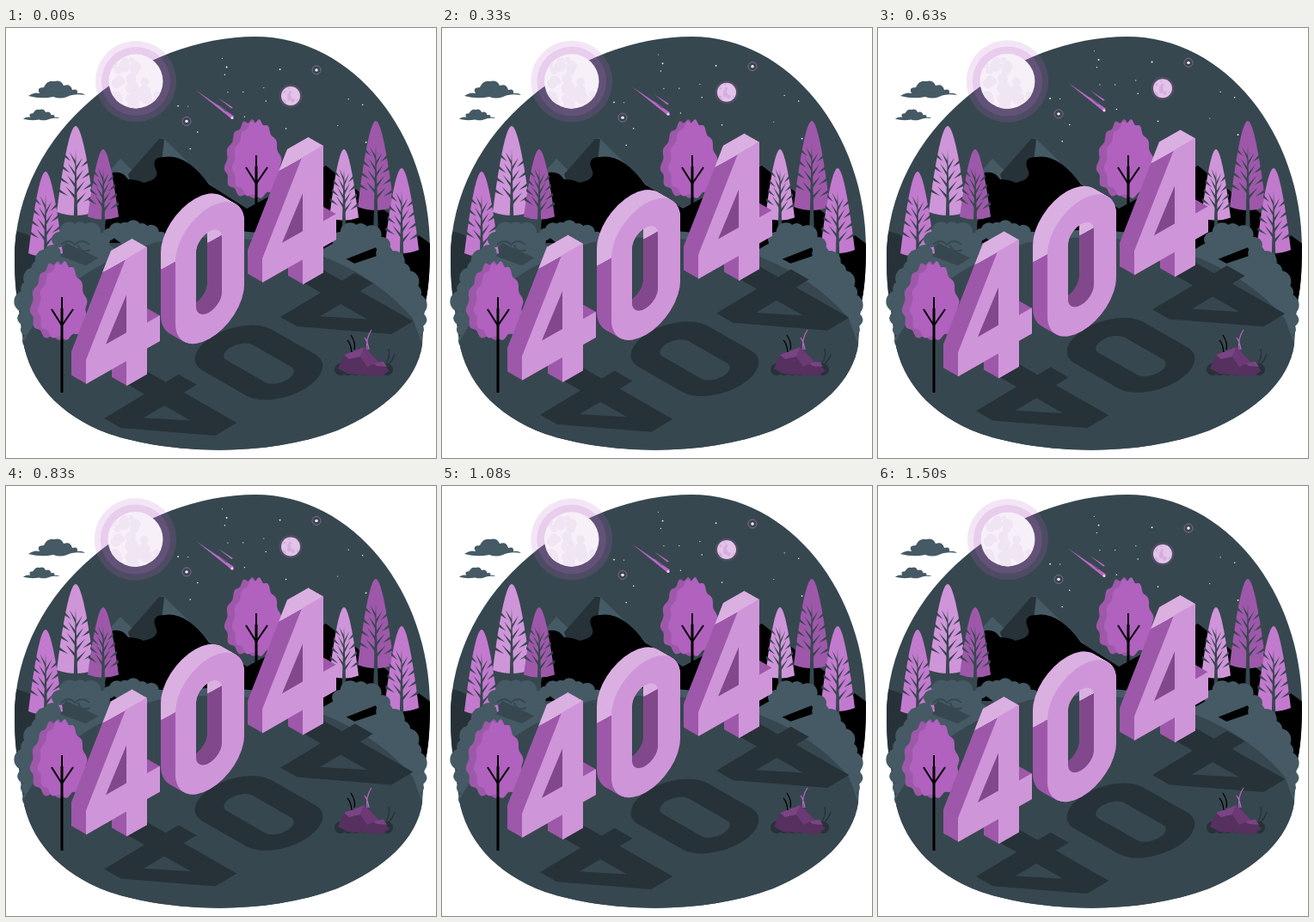
Recreate the animation shown at these times as an HTML page with a canvas. Size 500 by 500 pixels, loop 1540 ms.

```html
<!DOCTYPE html>
<html lang="en">
<head>
<meta charset="utf-8">
<style>
html, body { margin: 0; height: 100%; overflow: hidden; background: #fff; }
canvas { display: block; width: 500px; height: 500px; }
</style>
</head>
<body>
<canvas id="stage" width="500" height="500"></canvas>
<script>
const ctx = document.getElementById('stage').getContext('2d');
const LOOP = 1540, PEAK = 725, LIFT = 9;
const SLATE = '#37474f', LIGHT_SLATE = '#455a64', SHADOW = '#263238';
const PURPLE = '#ba68c8', FRONT = '#cf95d9', SIDE = '#9e58aa', TOP = '#dab0e1', WALL = '#82488c';

function seeded(seed) {
  return (min, max) => {
    seed = seed * 16807 % 2147483647;
    return min + (max - min) * seed / 2147483647;
  };
}
function fill(color, d) {
  ctx.fillStyle = color;
  ctx.fill(d instanceof Path2D ? d : new Path2D(d), 'evenodd');
}
function line(color, width, d) {
  ctx.strokeStyle = color;
  ctx.lineWidth = width;
  ctx.stroke(new Path2D(d));
}
function dot(color, x, y, r) {
  ctx.fillStyle = color;
  ctx.beginPath();
  ctx.arc(x, y, r, 0, 7);
  ctx.fill();
}
function at(x, y, draw) {
  ctx.save();
  ctx.translate(x, y);
  draw();
  ctx.restore();
}
function clipped(path, draw) {
  ctx.save();
  ctx.clip(path);
  draw();
  ctx.restore();
}

const GROUND = 'L484 368C478 410 440 445 385 468C300 500 190 495 120 472C60 450 28 410 20 365';
const BLOB = new Path2D(`M290 10C405 10 493 125 493 255Q493 300 487 322${GROUND}L14 322Q10 300 10 270C10 115 160 10 290 10Z`);

function cloud(x, y, scale) {
  at(x, y, () => {
    ctx.scale(scale, scale);
    fill(LIGHT_SLATE, 'M-33 9Q-26 4 -20 6Q-24 -1 -15 -1Q-11 -10 -3 -8Q5 -10 8 -3Q16 -6 18 2Q25 0 24 6Q30 5 33 8Q20 6 12 10Q4 13 -4 10Q-18 13 -33 9Z');
  });
}

function globe(color, patch, r, count) {
  const random = seeded(9), disc = new Path2D();
  disc.arc(0, 0, r, 0, 7);
  fill(color, disc);
  clipped(disc, () => {
    for (let i = 0; i < count; i++) {
      dot(patch, random(-r, r), random(-r, r), r * random(.08, .24));
    }
  });
}

function stars() {
  const random = seeded(42);
  for (let i = 0; i < 18; i++) {
    dot('#fff', random(200, 420), random(34, 142), random(.5, 1));
  }
  for (const [x, y] of [[361, 49], [210, 108.5]]) {
    dot('#fff', x, y, 1.7);
    line('#9a70a6', .8, `M${x - 5} ${y}a5 5 0 1 0 10 0a5 5 0 1 0 -10 0`);
  }
  at(331, 79, () => {
    dot('rgba(186,104,200,.18)', 0, 0, 13.5);
    globe('#e3c3e9', '#d5add e'.replace(' ', ''), 11, 12);
  });
  at(263, 104.5, () => {
    fill(PURPLE, 'M-42 -32L2 -2 -1 1ZM-16 -23L1 -12 -1 -11ZM-18 -16L-6 -8 -7 -7Z');
    dot('#edcdf2', 0, 0, 1.6);
  });
}

function moon(rise) {
  at(151 - rise * .06, 62, () => {
    const k = 1 + rise * .0018;
    ctx.scale(k, k);
    dot('rgba(186,104,200,.17)', 0, 0, 47);
    dot('rgba(186,104,200,.2)', 0, 0, 40);
    globe('#f7f0f9', '#f0e5f3', 31.5, 26);
  });
}

function mountains() {
  fill(SHADOW, 'M8 236Q50 240 65 300V325H8Z');
  fill(LIGHT_SLATE, 'M90 200L133 152 182 200ZM182 127L250 194H180Z');
  fill(SHADOW, 'M142 170L178 129 184 129 176 200H150Z');
  fill('#000', 'M112 250L124 168Q136 166 142 176Q152 176 160 180Q180 176 174 164Q168 150 184 150Q210 146 236 182L280 210 372 160 410 190 495 252V322H280V250Z');
}

function pine(x, y, w, h, color) {
  at(x, y, () => {
    fill(color, `M0 0C${w * .35} 0 ${w * .75} ${h * .55} ${w} ${h * .97}Q0 ${h * 1.05} ${-w} ${h * .97}C${-w * .75} ${h * .55} ${-w * .35} 0 0 0Z`);
    for (let i = 0; i < 8; i++) {
      const s = i % 2 ? 1 : -1, level = h * (.36 + .065 * i), edge = w * (.55 + .055 * i);
      fill(SLATE, `M${s * (edge + 1)} ${level - 5}V${level - 1}L${s * edge * .45} ${level + 4}Z`);
      fill(SLATE, `M0 ${level + 4}L${s * edge * .6} ${level - 7}L0 ${level + 9}Z`);
    }
    fill(SLATE, `M0 ${h * .27}L2.8 ${h + 24}H-2.8Z`);
  });
}

// Egg-shaped crown with a wavy rim.
function crown(color, x, w) {
  const path = new Path2D();
  for (let a = 0; a < 6.28; a += .06) {
    const r = 1 + .05 * Math.sin(13 * a);
    path.lineTo(x + w * r * Math.sin(a) * (1 - .25 * Math.cos(a)), 46 - 44 * r * Math.cos(a));
  }
  fill(color, path);
}
function leafyTree(x, y, trunk) {
  at(x, y, () => {
    crown(SIDE, -7, 28);
    crown('#b062be', 1, 27);
    line('#000', 3, `M0 55V${trunk}`);
    line('#000', 2, 'M0 42V60M0 75L13 56M0 75L-12 56');
  });
}

// Round tufts along a quadratic curve, filled inwards to the hill.
function hedge(x0, y0, cx, cy, x1, y1, count, r) {
  fill(LIGHT_SLATE, `M${x0} ${y0}Q${cx} ${cy} ${x1} ${y1}L240 330Z`);
  for (let i = 0; i <= count; i++) {
    const t = i / count, u = 1 - t;
    dot(LIGHT_SLATE, u * u * x0 + 2 * u * t * cx + t * t * x1, u * u * y0 + 2 * u * t * cy + t * t * y1, r * (i % 2 ? 1.15 : .9));
  }
}
function bushes() {
  hedge(120, 240, 146, 223, 180, 244, 6, 8);
  hedge(62, 246, 85, 222, 112, 247, 4, 10);
  hedge(54, 262, 34, 280, 22, 318, 5, 11);
  hedge(21, 323, 20, 345, 27, 364, 3, 7);
  hedge(388, 246, 412, 223, 438, 252, 4, 10);
  hedge(440, 262, 470, 285, 477, 322, 5, 11);
  hedge(481, 328, 483, 345, 476, 362, 3, 7);
  line(SLATE, 2, 'M64 252Q73 244 80 252Q88 244 97 252M84 252Q86 262 98 258');
}

function hill() {
  fill(LIGHT_SLATE, 'M24 372C40 325 70 270 170 242C260 224 405 236 478 338L440 340Z');
  fill(SLATE, `M20 365C40 330 70 282 175 249C250 236 390 240 473 338${GROUND}Z`);
}

function rocks() {
  for (let x = 389; x < 447; x += 9) dot(SHADOW, x, 397, 7);
  fill('#56305e', 'M386 396L393 380 417 371 433 388 446 398 437 405 397 402Z');
  fill('#7a4384', 'M393 380L417 371 412 382 399 385ZM426 389L439 388 443 394 431 393Z');
  fill('#6b3a74', 'M412 382L417 371 433 388 420 394Z');
  line('#000', 1.3, 'M405 374Q407 366 401 357M402 377Q401 367 397 363');
  line(PURPLE, 1.2, 'M420 374Q418 361 425 351M422 374Q421 366 417 360');
  line(SHADOW, 1.3, 'M442 390Q447 382 445 373M445 391Q451 384 452 379');
}

// Digits are drawn flat, then sheared onto the wall or laid on the ground.
const four = {
  outer: new Path2D('M0 0V-28L46 -119H71V-31H86V-1H71V29H47V0Z'),
  hole: new Path2D('M47 -77V-33H23Z'),
  top: new Path2D('M-40 -119H71V-150H-40Z')
};
const zero = { outer: new Path2D(), hole: new Path2D(), top: new Path2D('M-40 -100H90V-190H-40Z') };
zero.outer.roundRect(0, -140, 80, 153, 40);
zero.hole.roundRect(24, -112, 30, 94, 15);
for (const shape of [four, zero]) {
  shape.face = new Path2D(shape.outer);
  shape.face.addPath(shape.hole);
}
const DIGITS = [
  { shape: four, x: 298, y: 296, shadowX: 319, shadowY: 336 },
  { shape: zero, x: 197, y: 371, shadowX: 209.5, shadowY: 387.6 },
  { shape: four, x: 93, y: 414, shadowX: 114, shadowY: 454 }
];

function digit({ shape, x, y }) {
  const extrude = color => {
    for (let k = 17; k >= 0; k--) at(-k, -k * 1.14, () => fill(color, shape.face));
  };
  at(x, y, () => {
    ctx.transform(1, -.57, 0, 1, 0, 0);
    extrude(SIDE);
    clipped(shape.hole, () => extrude(WALL));
    clipped(shape.top, () => extrude(TOP));
    fill(FRONT, shape.face);
  });
}
function shadow({ shape, shadowX, shadowY }) {
  at(shadowX, shadowY, () => {
    ctx.transform(1, -.6, -.7, -.4, 0, 0);
    fill(SHADOW, shape.face);
  });
}

function draw(now) {
  const rise = LIFT * (1 + Math.cos(2 * Math.PI * (now % LOOP - PEAK) / LOOP)) / 2;
  ctx.clearRect(0, 0, 500, 500);
  cloud(59, 70, 1);
  cloud(41, 100, .64);
  fill(SLATE, BLOB);
  at(0, -rise, stars);
  moon(rise);
  clipped(BLOB, mountains);
  pine(81, 114, 22, 103, FRONT);
  pine(113, 141, 18, 81, SIDE);
  pine(46, 167, 20, 98, '#c27ace');
  pine(430, 108, 21, 103, SIDE);
  pine(393, 141, 17, 82, FRONT);
  pine(460, 163, 20, 98, '#c27ace');
  leafyTree(291, 106, 100);
  bushes();
  hill();
  at(0, -rise, () => DIGITS.forEach(shadow));
  rocks();
  leafyTree(65, 271, 153);
  at(0, -rise, () => DIGITS.forEach(digit));
}

const start = performance.now();
function tick() {
  draw(performance.now() - start);
  requestAnimationFrame(tick);
}
tick();
</script>
</body>
</html>
```
